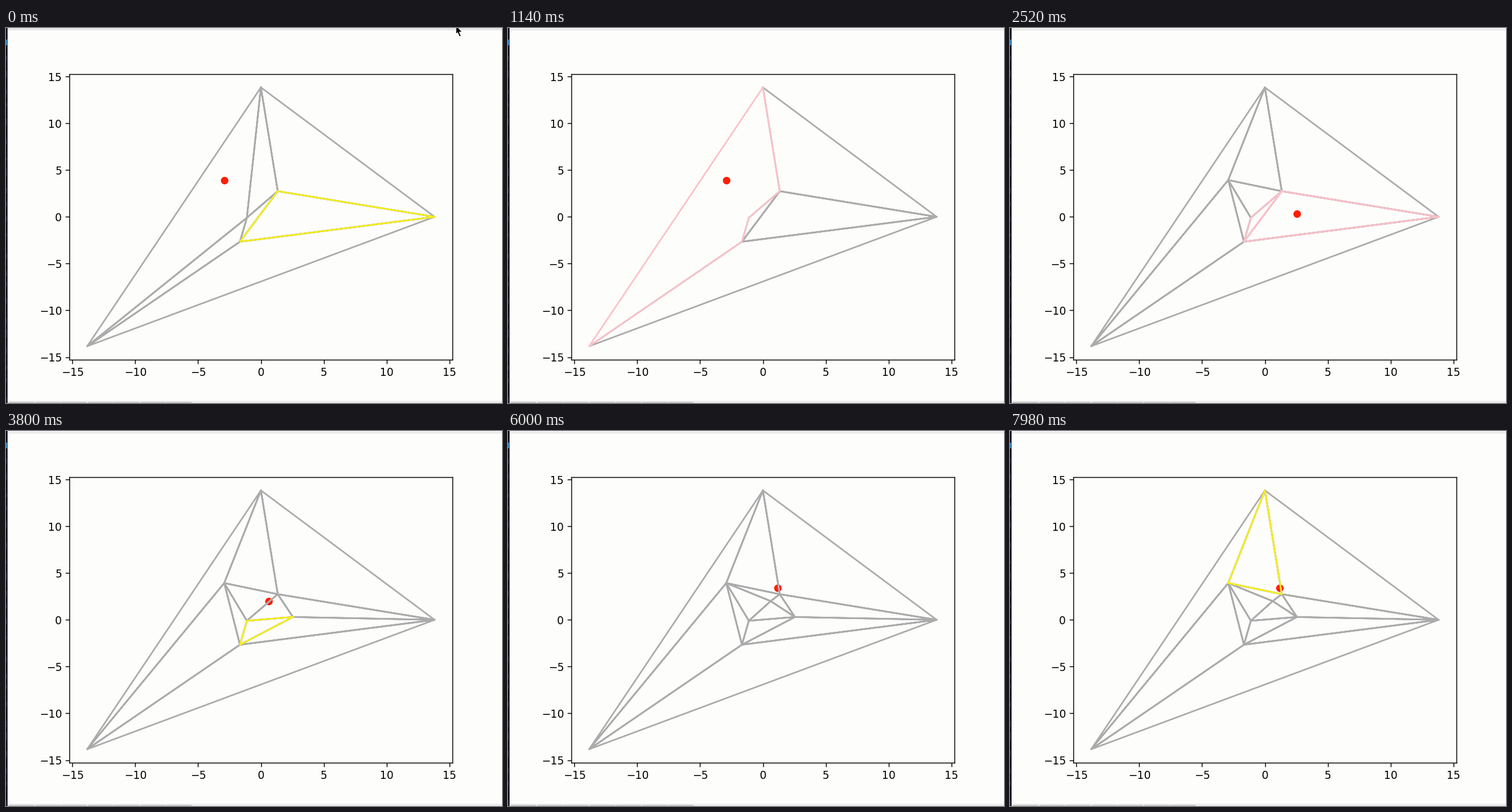
Recreate the animation shown at these times as a matplotlib script. Size 861x650 px, loop 8000 ms.

```python
import random

import matplotlib.pyplot as plt
from matplotlib.animation import FuncAnimation
from matplotlib.patches import Polygon, Rectangle

W, H, DPI = 861, 650, 134
STEP, LOOP = 40, 8000
PAPER = "#fdfdfc"
GREY, YELLOW, PINK, RED = "#ababab", "#f7f01c", "#fbc1c9", "#ff1e06"

POINTS = {
    "A": (0, 13.83), "B": (13.83, 0), "C": (-13.83, -13.83),
    "P": (1.34, 2.74), "Q": (-1.12, -0.10), "R": (-1.67, -2.66),
    "S": (-2.92, 3.93), "T": (2.55, 0.30), "U": (0.62, 2.00),
    "V": (1.17, 3.40),
}


def insert(mesh, bad, hole, point):
    """Return the mesh without its bad triangles, and the refilled mesh."""
    rest = [tri for tri in mesh if tri not in bad]
    ring = zip(hole, hole[1:] + hole[:1])
    return rest, rest + [point + a + b for a, b in ring]


BAD_S, HOLE_S = ["ACQ", "APQ", "QRC"], "APQRC"
BAD_T, HOLE_T = ["PQR", "PRB"], "PQRB"
BAD_U, HOLE_U = ["SPQ", "TPQ"], "PTQS"

mesh_0 = BAD_S + BAD_T + ["APB", "RBC"]
rest_s, mesh_s = insert(mesh_0, BAD_S, HOLE_S, "S")
rest_t, mesh_t = insert(mesh_s, BAD_T, HOLE_T, "T")
rest_u, mesh_u = insert(mesh_t, BAD_U, HOLE_U, "U")

# start in ms, mesh, highlighted polygons, their colour, query point
STATES = [
    (0, mesh_0, ["PRB"], YELLOW, "S"),
    (20, mesh_0, ["PQR"], YELLOW, "S"),
    (280, mesh_0, ["APQ"], YELLOW, "S"),
    (560, mesh_0, ["ACQ"], YELLOW, "S"),
    (820, mesh_0, BAD_S, PINK, "S"),
    (1100, rest_s, [HOLE_S], PINK, "S"),
    (1660, mesh_s, [], GREY, "T"),
    (2080, mesh_s, ["PRB"], YELLOW, "T"),
    (2500, mesh_s, BAD_T, PINK, "T"),
    (2920, rest_t, [HOLE_T], PINK, "T"),
    (3340, mesh_t, [], GREY, "U"),
    (3760, mesh_t, ["TQR"], YELLOW, "U"),
    (4200, mesh_t, ["TPQ"], YELLOW, "U"),
    (4480, mesh_t, ["SPQ"], YELLOW, "U"),
    (4880, mesh_t, BAD_U, PINK, "U"),
    (5300, rest_u, [HOLE_U], PINK, "U"),
    (5720, mesh_u, [], GREY, "V"),
    (6140, mesh_u, ["TQR"], YELLOW, "V"),
    (6580, mesh_u, ["UTQ"], YELLOW, "V"),
    (6880, mesh_u, ["UPT"], YELLOW, "V"),
    (7280, mesh_u, ["TBP"], YELLOW, "V"),
    (7680, mesh_u, ["APB"], YELLOW, "V"),
    (7980, mesh_u, ["SAP"], YELLOW, "V"),
]


def outline(polygons):
    """Closed outlines as one line, broken by gaps."""
    gap = (float("nan"), float("nan"))
    path = [gap]
    for names in polygons:
        path += [POINTS[name] for name in names + names[0]] + [gap]
    return zip(*path)


# The small surplus keeps the pixel size from being rounded down
fig = plt.figure(figsize=((W + 0.01) / DPI, (H + 0.01) / DPI), dpi=DPI,
                 facecolor=PAPER)

# Window edges around the plot, in pixels from the top left
desk = fig.add_axes([0, 0, 1, 1])
desk.set(xlim=(0, W), ylim=(H, 0))
desk.axis("off")


def box(x, y, w, h, color):
    patch = Rectangle((x, y), w, h, fc=color, lw=0, antialiased=False)
    return desk.add_patch(patch)


box(0, 0, W, 3, "#f2f2f2")
box(0, 3, W, 1, "#dddddd")
title_bar = box(0, 0, W, 4, "#e6e6e6")
box(0, 646, W, 4, "#ececec")
for i in range(7):
    box(5 + 45.5 * i, 648, 44, 2, "#c6c6c3")
box(0, 0, 2, H, "#0e0f1a")
box(2, 0, 1, H, "#50505a")
rng = random.Random(4)
for y in range(45, 640, 28):
    box(0, y + rng.randint(0, 12), 1, rng.randint(5, 14), "#34344c")
box(0, 20, 2, 10, "#3d86c6")
cursor = desk.add_patch(Polygon(
    [(781, -4), (781, 11), (784, 8), (787, 15), (790, 14),
     (787, 7), (792, 7), (782, -4)],
    fc="black", ec="white", lw=0.6))

ax = fig.add_axes([110 / W, 1 - 574.6 / H, 665 / W, 494.6 / H],
                  facecolor=PAPER)
ax.set(xlim=(-15.25, 15.25), ylim=(-15.25, 15.25))
ax.set_xticks(range(-15, 16, 5))
ax.set_yticks(range(-15, 16, 5))

dot, = ax.plot([], [], "o", color=RED, ms=6, mew=1, zorder=1)
edges, = ax.plot([], [], color=GREY, lw=1.5)
accent, = ax.plot([], [], color=YELLOW, lw=1.5, zorder=3)


def update(frame):
    # A state shows in the frame during which it begins, except the first
    now = frame * STEP + (STEP / 2 if frame else 0)
    _, mesh, marked, color, query = [s for s in STATES if s[0] <= now][-1]
    edges.set_data(*outline(mesh))
    accent.set_data(*outline(marked))
    accent.set_color(color)
    x, y = POINTS[query]
    dot.set_data([x], [y])
    cursor.set_visible(frame == 0)
    title_bar.set_visible(frame == 0)
    return edges, accent, dot, cursor, title_bar


anim = FuncAnimation(fig, update, frames=LOOP // STEP, interval=STEP,
                     repeat=True, repeat_delay=0)
plt.show()
```
